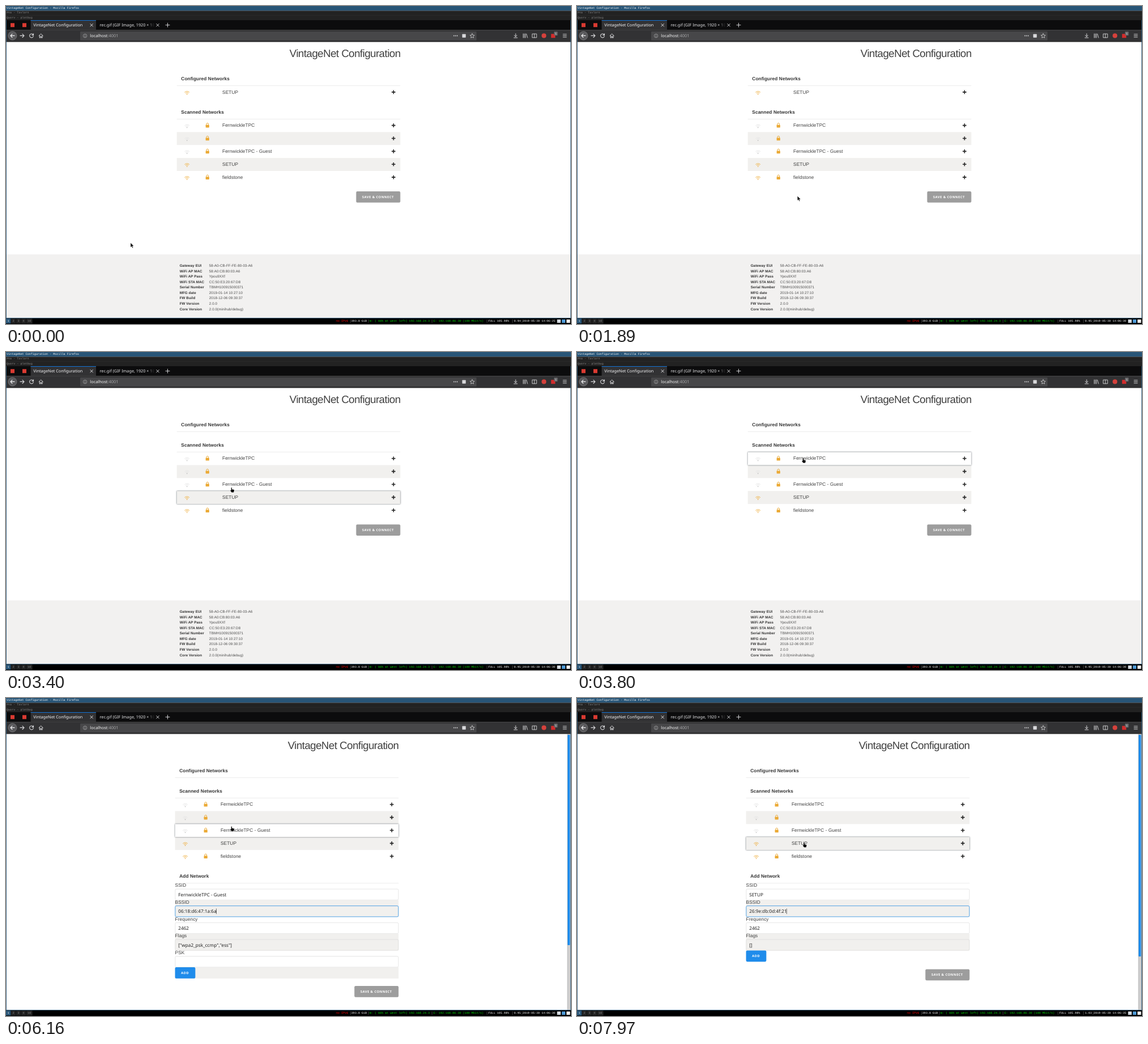
Recreate the animation shown at these times as an HTML page. Size 998 by 561 pixels, loop 8 s.

```html
<!DOCTYPE html>
<html lang="en">
<head>
<meta charset="utf-8">
<title>VintageNet Configuration</title>
<style>
html, body { margin: 0; width: 100%; height: 100%; overflow: hidden; background: #fff; }
svg { display: block; }
#stage { width: 998px; height: 561px; }
text { white-space: pre; text-rendering: geometricPrecision; }
.page { font-family: "Liberation Sans", Arial, sans-serif; letter-spacing: .01em; }
.ui { font-family: "Noto Sans", sans-serif; }
.mono { font-family: "Liberation Mono", monospace; }
.bold { font-weight: 700; }
.caps { font-weight: 700; letter-spacing: .52px; }
.lift { filter: drop-shadow(0 0 1.1px rgba(30, 40, 50, .75)); }
.line { fill: none; stroke-linecap: round; stroke-linejoin: round; }
</style>
</head>
<body>
<svg id="stage" viewBox="0 0 998 561">
  <rect width="998" height="561" fill="#fff"/>
  <g id="page"></g>
  <g id="chrome"></g>
  <g id="tab"></g>
  <g id="status"></g>
  <g id="arrow"><path d="M0 0V8.1L1.9 6.4L3.2 9.3L4.5 8.7L3.3 5.9H5.8Z" fill="#000" stroke="#fff" stroke-width=".45"/></g>
  <g id="hand"><path d="M1.6 .6Q2.4 -.3 3.2 .6V3.2L6.4 3.9Q7.3 4.3 7 5.5L6.2 8.8H2.5L.3 5.7Q.2 4.3 1.6 4.9Z" fill="#000" stroke="#fff" stroke-width=".3"/></g>
</svg>
<script>
const LOOP = 8000, ROW = 22.87, GREY = '#f1f0ee', INK = '#3f3f3f', BLUE = '#1f8ceb';
const $ = id => document.getElementById(id);

// --- drawing helpers ---
const rect = (x, y, w, h, fill, more = '') =>
  `<rect x="${x}" y="${y}" width="${w}" height="${h}" fill="${fill}" ${more}/>`;
const text = (x, y, s, size, fill, cls, more = '') =>
  `<text x="${x}" y="${y}" font-size="${size}" fill="${fill}" class="${cls}" ${more}>${s.replace(/&/g, '&amp;')}</text>`;
const line = (d, color, width = 1, more = '') =>
  `<path class="line" d="${d}" stroke="${color}" stroke-width="${width}" ${more}/>`;
const clip = (x, y, w, h, body) => `<svg x="${x}" y="${y}" width="${w}" height="${h}" viewBox="${x} ${y} ${w} ${h}">${body}</svg>`;
const mono = (x, y, s, fill) => text(x, y, s, 5.08, fill, 'mono');
const ui = (x, y, s, size, fill) => text(x, y, s, size, fill, 'ui');

// --- browser and desktop frame ---
function drawChrome() {
  const pale = '#d8d8da';
  let s = rect(0, 0, 998, 8.3, '#285577') + rect(0, 8.3, 998, 17, '#222')
    + rect(0, 16.2, 998, .5, '#333')
    + mono(1, 5, 'VintageNet Configuration - Mozilla Firefox', '#fff')
    + mono(1, 13.3, '#na - Tavlorn', '#888') + mono(1, 21.6, 'Quorv - plotbug', '#888')
    + rect(0, 25, 998, 17.4, '#0c0c0d') + rect(0, 42.2, 998, 21, '#323234')
    + rect(0, 62.7, 998, .6, '#0c0c0d');
  for (const x of [8, 29]) s += rect(x, 30.2, 7, 7, '#d93a31');

  // second tab
  s += clip(160, 25, 102, 17, ui(165.5, 36.3, 'rec.gif (GIF Image, 1920 × 1080)', 7.25, '#e4e4e6'))
    + '<linearGradient id="fade"><stop stop-color="#0c0c0d" stop-opacity="0"/><stop offset="1" stop-color="#0c0c0d"/></linearGradient>'
    + rect(249, 26, 13.5, 16, 'url(#fade)')
    + line('M265.7 31.4l4.6 4.6m0 -4.6l-4.6 4.6M282 33.6h7m-3.5 -3.5v7', '#e4e4e6', .9);

  // navigation buttons
  s += `<circle cx="11.4" cy="52.4" r="7.6" fill="#59595c" stroke="#88888a" stroke-width=".6"/>`
    + line('M15 52.4H8m3 -3.1L8 52.4l3 3.1', '#f3f3f4', 1.1)
    + line('M25 52.4h7m-3 -3.1l3 3.1l-3 3.1', pale, 1.1)
    + line('M58 52.6l3.7 -3.5l3.7 3.5M59.3 52v4.1h1.6v-2.3h1.6v2.3h1.6V52', pale, 1);

  // address field
  s += rect(131, 44.9, 700, 15.8, '#474749', 'rx="1.2"')
    + `<circle cx="139.6" cy="52.6" r="3.2" fill="none" stroke="#b5b5b7" stroke-width=".7"/>`
    + line('M139.6 52.5v1.7M139.6 50.9v.1', '#b5b5b7', .8)
    + ui(148.3, 55.2, 'localhost<tspan fill="#a6a6a8">:4001</tspan>', 7.4, '#f3f3f4');
  for (const x of [791.3, 794.2, 797.1]) s += `<circle cx="${x}" cy="52.5" r=".9" fill="${pale}"/>`;
  s += rect(805.8, 49.4, 6.4, 6.4, pale, 'rx=".8"')
    + line('M823.5 48.7l1.2 2.5l2.7 .4l-2 1.9l.5 2.7l-2.4 -1.3l-2.4 1.3l.5 -2.7l-2 -1.9l2.7 -.4Z', pale, .8);

  // toolbar
  s += line('M900.2 48.8v5.2m-2.4 -2.2l2.4 2.4l2.4 -2.4M897.2 56h6', pale, 1)
    + line('M913.6 49v7m2 -7v7m2 -7v7m1.6 -6.8l2 6.8', pale, .9)
    + line('M929.8 49.2h7.4v6.6h-7.4ZM933.2 49.2v6.6', pale, .9)
    + `<circle cx="950.2" cy="52.4" r="4.1" fill="#d5413c"/>`
    + rect(962.8, 49.2, 7.4, 7, '#d22c2c')
    + rect(968, 45.2, 6.4, 6.8, '#68686b', 'rx=".8"') + ui(969.6, 50.7, '1', 5.2, '#fff')
    + line('M984 49.8h6M984 52.4h6M984 55h6', pale, .9);

  // window border and bar
  s += rect(0, 25, .9, 526, '#285577') + rect(997.1, 25, .9, 526, '#285577')
    + rect(0, 550.2, 998, .9, '#285577') + rect(0, 551, 998, 10, '#000');
  [['1', 0, 8.4], ['2', 8.9, 8.4], ['3', 17.8, 8.4], ['4', 26.7, 8.4], ['10', 35.6, 11]].forEach(([n, x, w], i) => {
    s += rect(x, 551.4, w, 8.6, i ? '#222' : '#285577') + mono(x + 2.6, 557.2, n, i ? '#888' : '#fff');
  });
  s += mono(583, 557.2, 'no IPv6', '#f00') + mono(609.8, 557.2, '393.8 GiB', '#fff')
    + mono(642, 557.2, 'W: ( 66% at west loft) 192.168.24.3', '#00d800')
    + mono(755, 557.2, 'E: 192.168.86.30 (100 Mbit/s)', '#00d800')
    + mono(852, 557.2, 'FULL 105.98%', '#fff');
  for (const x of [608, 639.8, 752.4, 849.6, 894.4, 911]) s += rect(x, 552.8, .5, 6, '#777');
  s += rect(973.4, 553, 6.4, 6, '#d4dae0') + rect(981.8, 553, 6.2, 6, '#4d9ad6') + rect(990, 553, 6.4, 6, '#f4f4f4');
  $('chrome').innerHTML = s;
}

function drawTab(loading) {
  $('tab').innerHTML = rect(43.6, 25, 115.4, 17.4, '#323234') + rect(43.6, 25, 115.4, .8, '#0a84ff')
    + clip(44, 26, 101, 16, ui(loading ? 60 : 48.2, 36.3, 'VintageNet Configuration', 7.25, '#f6f6f7'))
    + (loading ? '<circle cx="52.8" cy="33.6" r="1" fill="#c8c8ca"/>' : '')
    + line('M148.9 31.4l4.6 4.6m0 -4.6l-4.6 4.6', '#f0f0f1', .9)
    + line('M47.7 50.3A3.4 3.4 0 1 0 48.4 53M48.5 48.8v2.6h-2.6', loading ? '#58585b' : '#d8d8da', 1.1);
}

function drawStatus(step) {
  $('status').innerHTML = mono(897.2, 557.2, ['0.94', '0.95', '1.03'][step], '#fff')
    + mono(912.4, 557.2, '2019-05-30 14:06:' + (25 + 5 * step), '#fff');
}

// --- page ---
const NETS = [
  ['FernwickleTPC', 0, 1], ['', 0, 1], ['FernwickleTPC - Guest', 0, 1], ['SETUP', 1, 0], ['fieldstone', 1, 1]
];
const PSK = '["wpa2_psk_ccmp","ess"]';
const FORMS = [null,
  { ssid: NETS[0][0], bssid: '04:18:d6:47:1a:6a', caret: 371.3, flags: PSK, psk: true },
  { ssid: NETS[2][0], bssid: '06:18:d6:47:1a:6a', caret: 371.3, flags: PSK, psk: true },
  { ssid: 'SETUP', bssid: '26:9e:db:0d:4f:21', caret: 370, flags: '[]', psk: false }
];
const FACTS = [
  ['Gateway EUI', '58-A0-CB-FF-FE-80-03-A6'], ['WiFi AP MAC', '58:A0:CB:80:03:A6'], ['WiFi AP Pass', 'Ypou9XXf'],
  ['WiFi STA MAC', 'CC:50:E3:20:67:D8'], ['Serial Number', 'TBMH100915000371'], ['MFG date', '2019-01-14 10:27:10'],
  ['FW Build', '2018-12-06 09:30:37'], ['FW Version', '2.0.0'], ['Core Version', '2.0.0(minihub/debug)']
];

function wifi(x, y, strong) {
  const arc = (r, c) => line(`M${x - r * .72} ${y - r * .69}A${r} ${r} 0 0 1 ${x + r * .72} ${y - r * .69}`, c, .95);
  const [far, near, dot] = strong ? ['#efb245', '#efab35', '#eda32b'] : ['#e6e6e6', '#e3e3e3', '#b9b9b9'];
  return arc(5.5, far) + arc(3.2, near) + `<circle cx="${x}" cy="${y - .2}" r=".85" fill="${dot}"/>`;
}
const lock = (x, y) => rect(x - 3.1, y - .7, 6.2, 4.8, '#ebaa36', 'rx=".7"')
  + line(`M${x - 1.8} ${y - .6}v-1.4a1.8 1.8 0 0 1 3.6 0v1.4`, '#ebaa36', 1);

function netRow([name, strong, locked], y) {
  const c = y + 11.2;
  return wifi(319.7, c + 3.9, strong) + (locked ? lock(355.8, c - .3) : '')
    + text(382, y + 13.8, name, 8.32, INK, 'page')
    + line(`M681.2 ${c}h6.6m-3.3 -3.3v6.6`, '#222', 1.6, 'style="stroke-linecap:butt"');
}
const heading = (s, y) => text(309.3, y - 9.8, s, 8.32, '#333', 'page bold') + rect(301.7, y - .3, 394.8, .55, '#dcdcdc');
const button = (x, y, w, s, fill) => rect(x, y, w, 19.76, fill, 'rx="2.1"')
  + text(x + 10.6, y + 12, s, 5.72, '#fff', 'ui caps');

function formBody(f, y, focus, caret) {
  const x = 301.7, w = 394.8, step = 29.65;
  const fields = [['SSID', f.ssid], ['BSSID', f.bssid], ['Frequency', '2462'], ['Flags', f.flags]];
  if (f.psk) fields.push(['PSK', '']);
  let s = '';
  fields.forEach(([label, value], i) => {
    const top = y + i * step, on = i === 1 && focus;
    if (i % 2) s += rect(x, top, w, step, GREY);
    s += text(x, top + 6.6, label, 8.32, INK, 'page')
      + rect(x + .3, top + 10.2, w - .6, 19.2, 'none', `rx="2" stroke="${on ? '#2a8de0' : '#d1d1d1'}" stroke-width="${on ? .8 : .55}"`)
      + text(x + 5.7, top + 22.9, value, 8.2, '#222', 'ui');
    if (i === 1 && caret) s += rect(f.caret + 3, top + 15, .55, 9.6, '#000');
  });
  const end = y + fields.length * step;
  if (fields.length % 2) s += rect(x, end, w, 19.76, GREY);
  return [s + button(x, end, 35.8, 'ADD', BLUE), end + 19.76];
}

function drawPage({ config, rows, hover, form, focus, caret, waiting }) {
  const f = FORMS[form];
  let s = text(500.8, 90, 'VintageNet Configuration', 18.7, INK, 'page', 'style="letter-spacing:-.52px"')
    + heading('Configured Networks', 140.7);
  if (config) s += netRow(NETS[3], 140.7);
  const top = 176.6 + (config ? ROW : 0);
  let end = top;
  s += heading('Scanned Networks', top);
  if (rows) {
    const back = (i, cls) => rect(301.7, top + i * ROW, 394.8, ROW, i % 2 ? GREY : '#fff', `class="${cls}"`);
    NETS.forEach((n, i) => { if (i % 2) s += back(i, ''); });
    if (hover >= 0) s += back(hover, 'lift');
    NETS.forEach((n, i) => { s += netRow(n, top + i * ROW); });
    end += NETS.length * ROW;
  }
  if (f) {
    const y = end + 35.9;
    const [body, bottom] = formBody(f, y, focus, caret);
    s += heading('Add Network', y) + body;
    end = bottom;
  }
  s += button(618.5, end + 13.2, 78, 'SAVE & CONNECT', '#9d9d9d');

  if (f) {
    s = `<g transform="translate(-3.1 0)">${s}</g>` + rect(991, 63.3, 6.2, 487, '#cdcdcd')
      + rect(992, 65, 4.2, f.psk ? 371 : 391, BLUE, 'rx="1"');
  } else {
    s += rect(0, 438.2, 998, 113, '#f2f1f0');
    FACTS.forEach(([k, v], i) => {
      const y = 460.2 + i * 9.54;
      s += text(306.7, y, k, 6.28, '#333', 'page bold') + text(358.8, y, v, 6.28, '#4c4c4c', 'page');
    });
  }
  if (waiting) s += rect(0, 538.4, 168.6, 12.4, '#f3f3f3', 'stroke="#c4c4c4" stroke-width=".6"')
    + ui(3.6, 547.4, 'Waiting for localhost...', 7.2, '#333');
  $('page').innerHTML = s;
}

// --- motion: time, x, y, linear arrival ---
const PATH = [
  [0, 220, 417.7], [600, 220, 417.7], [640, 227, 417.5], [1100, 227, 417.5], [1890, 389.3, 335.2],
  [1910, 389.3, 335.2], [2490, 391.5, 316.2], [3150, 391.5, 316.2], [3400, 396, 239.2, 1], [3520, 396, 212, 1],
  [3800, 397, 187], [5180, 397, 187], [5780, 396, 226.3], [6160, 396, 226.3], [6790, 396.3, 251.3],
  [7720, 396.3, 251.3], [7970, 398.6, 254.8], [8000, 398.6, 254.8]
];
function pointer(t) {
  const i = Math.max(1, PATH.findIndex(k => k[0] >= t));
  const [t0, x0, y0] = PATH[i - 1], [t1, x1, y1, linear] = PATH[i];
  const p = Math.max(0, (t - t0) / (t1 - t0)), e = linear ? p : p * p * (3 - 2 * p);
  return [x0 + (x1 - x0) * e, y0 + (y1 - y0) * e];
}

const seen = {};
function update(name, state, draw) {
  const key = JSON.stringify(state);
  if (seen[name] !== key) { seen[name] = key; draw(state); }
}
const count = (t, times) => times.filter(k => t >= k).length;
const within = (t, a, b) => t >= a && t < b;

function render(t) {
  const config = t < 2760, rows = config || t >= 3100;
  // hover trails the pointer slightly
  const lag = pointer(Math.max(0, t - 70))[1];
  const at = Math.floor((lag + 1 - 176.6) / ROW);
  const hover = !config && rows && at >= 0 && at < NETS.length ? at : -1;
  const focus = !within(t, 5940, 6160) && !within(t, 7260, 7440);
  update('page', {
    config, rows, hover, focus,
    form: count(t, [4190, 6160, 7440]),
    caret: focus && !within(t, 5690, 5940),
    waiting: within(t, 2760, 3020)
  }, drawPage);
  update('tab', within(t, 2720, 3060), drawTab);
  update('status', count(t, [1400, 6400]), drawStatus);

  const move = `translate(${pointer(t).map(v => v.toFixed(2)).join(' ')})`;
  for (const id of ['arrow', 'hand']) {
    $(id).setAttribute('transform', move);
    $(id).style.display = (id === 'hand') === (hover >= 0) ? '' : 'none';
  }
}

drawChrome();
render(0);
const start = performance.now();
(function tick() {
  render((performance.now() - start) % LOOP);
  requestAnimationFrame(tick);
})();
</script>
</body>
</html>
```
